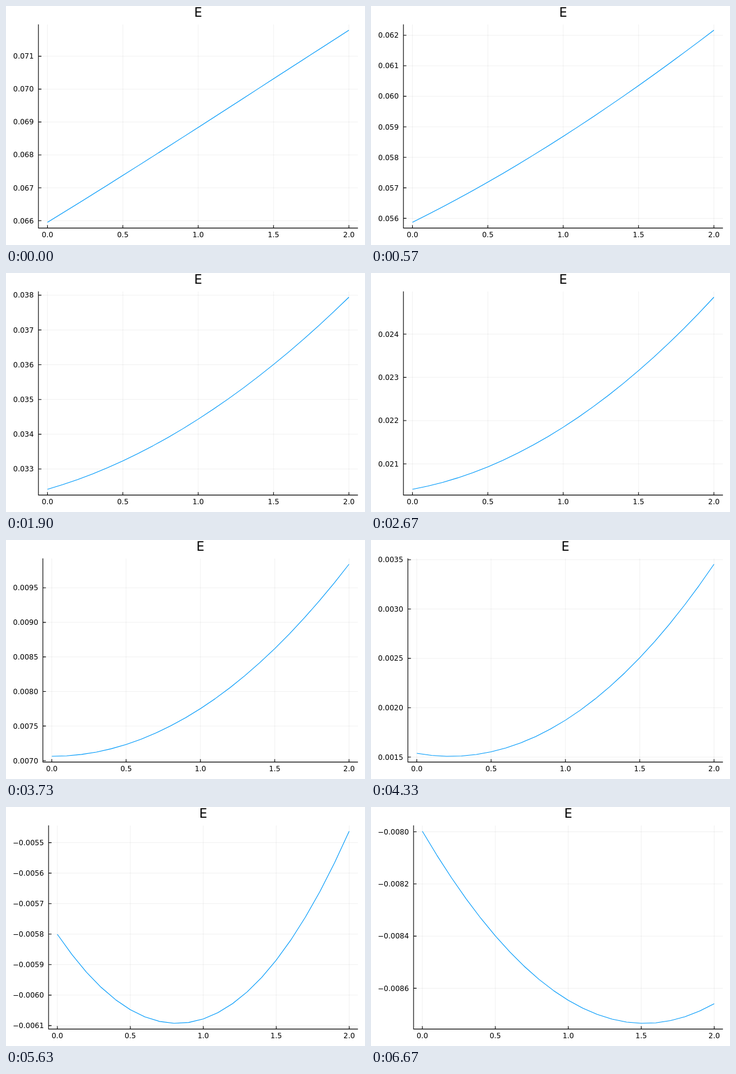
Write an HTML page that moves like this. It is 600 px wide and 400 px high and loops after 6710 ms.

```html
<!DOCTYPE html>
<html lang="en">
<head>
<meta charset="utf-8">
<title>E</title>
<style>
  html, body { margin: 0; width: 100%; height: 100%; overflow: hidden; background: #fff; }
  svg { display: block; width: 600px; height: 400px; }
  text { font: 12px "DejaVu Sans", sans-serif; fill: #000; }
  .title { font-size: 21px; text-anchor: middle; }
  .xlabel { text-anchor: middle; }
  .ylabel { text-anchor: end; }
  path { fill: none; }
  .grid { stroke: #000; stroke-opacity: .1; stroke-width: .6; }
  .axis { stroke: #000; stroke-width: 1.1; }
  .curve { stroke: #009afa; stroke-width: 1.1; stroke-linejoin: round; }
</style>
</head>
<body>
<svg id="plot" viewBox="0 0 600 400"></svg>
<script>
const LOOP = 6710, LAST = 200;
const TOP = 30.85, BOTTOM = 371.65, RIGHT = 588.2, PAD = 0.03;
const plot = document.getElementById('plot');

// Coefficients of E(x), in millionths, at a few steps of the sweep
const steps = [0, 34, 80, 112, 148, 169, 200];
const coeffs = [
  [65950, 45710, 20413, 7062.2, -2579.8, -5800.6, -7997.7],
  [2851, 1980, 648.5, -11, -512.9, -724.2, -965.9],
  [35, 566, 785.5, 700.3, 541.4, 446.6, 317.6],
  [-24, -18, -4, 4, 8.5, 9, 6]
];

const xs = Array.from({ length: 21 }, (_, i) => i / 10);

// Lagrange interpolation through the known steps
function interpolate(values, s) {
  return values.reduce((sum, v, i) => {
    steps.forEach((p, j) => { if (j !== i) v *= (s - p) / (steps[i] - p); });
    return sum + v;
  }, 0);
}

function energies(step) {
  const [a, b, c, d] = coeffs.map(row => interpolate(row, step) * 1e-6);
  return xs.map(x => a + b * x + c * x * x + d * x * (x - 1) * (x - 2));
}

// Choose the tick spacing by count, coverage and roundness
function pickTicks(lo, hi) {
  const spacings = [[1, 1], [5, .9], [2, .7], [2.5, .5], [3, .2]];
  const span = hi - lo;
  let best = { score: -Infinity };
  for (let e = -5; e <= -2; e++) {
    for (const [q, nice] of spacings) {
      const size = q * 10 ** e;
      const first = Math.ceil(lo / size), last = Math.floor(hi / size);
      const n = last - first + 1;
      if (n < 4 || n > 8) continue;
      const zero = first - 1 <= 0 && last + 1 >= 0 ? 1 : 0;
      const score = (1 - Math.abs(n - 5) / 5) / 4 + zero / 6
        + 0.5 * span / ((n - 1) * size) + nice / 4;
      const gain = score - best.score;
      if (gain > 1e-9 || (gain > -1e-9 && n < best.n)) {
        best = { score, n, size, first, digits: q === 2.5 ? 1 - e : -e };
      }
    }
  }
  const ticks = Array.from({ length: best.n }, (_, i) => (best.first + i) * best.size);
  return { ticks, digits: best.digits };
}

const px = v => v.toFixed(2);
const path = (cls, d) => `<path class="${cls}" d="${d}"/>`;
const label = (cls, x, y, s) => `<text class="${cls}" x="${px(x)}" y="${px(y)}">${s}</text>`;

function draw(step) {
  const es = energies(step);
  const min = Math.min(...es), max = Math.max(...es);
  const margin = (max - min) * PAD;
  const lo = min - margin, hi = max + margin;
  const { ticks, digits } = pickTicks(lo, hi);

  const left = 54.2 + 7.45 * (digits - 3) + (ticks[0] < -1e-9 ? 9.5 : 0);
  const toX = x => left + (RIGHT - left) * (x + 2 * PAD) / (2 + 4 * PAD);
  const toY = y => BOTTOM - (BOTTOM - TOP) * (y - lo) / (hi - lo);

  let grid = '', marks = '', labels = '';
  for (const v of [0, .5, 1, 1.5, 2]) {
    const x = px(toX(v));
    grid += `M${x} ${BOTTOM}V${TOP}`;
    marks += `M${x} ${BOTTOM}v-5`;
    labels += label('xlabel', toX(v), 387.4, v.toFixed(1));
  }
  for (const v of ticks) {
    const y = px(toY(v));
    grid += `M${px(left)} ${y}H${RIGHT}`;
    marks += `M${px(left)} ${y}h5`;
    const sign = v < -1e-9 ? '\u2212' : '';
    labels += label('ylabel', left - 7.8, toY(v) + 4.3, sign + Math.abs(v).toFixed(digits));
  }
  const frame = `M${px(left)} ${TOP}V${BOTTOM}H${RIGHT}`;
  const curve = 'M' + xs.map((x, i) => `${px(toX(x))} ${px(toY(es[i]))}`).join('L');

  plot.innerHTML = path('grid', grid) + path('axis', frame + marks) + labels
    + label('title', (left + RIGHT) / 2, 18, 'E') + path('curve', curve);
}

// Thirty steps a second, rounded to hundredths
const startOf = step => Math.round(step * 10 / 3) * 10;

function stepAt(t) {
  let step = Math.min(LAST, Math.floor(t * 0.03) + 1);
  while (step > 0 && startOf(step) > t) step--;
  return step;
}

const begin = performance.now();
let shown = -1;
function tick() {
  const step = stepAt((performance.now() - begin) % LOOP);
  if (step !== shown) draw(shown = step);
  requestAnimationFrame(tick);
}
tick();
</script>
</body>
</html>
```
